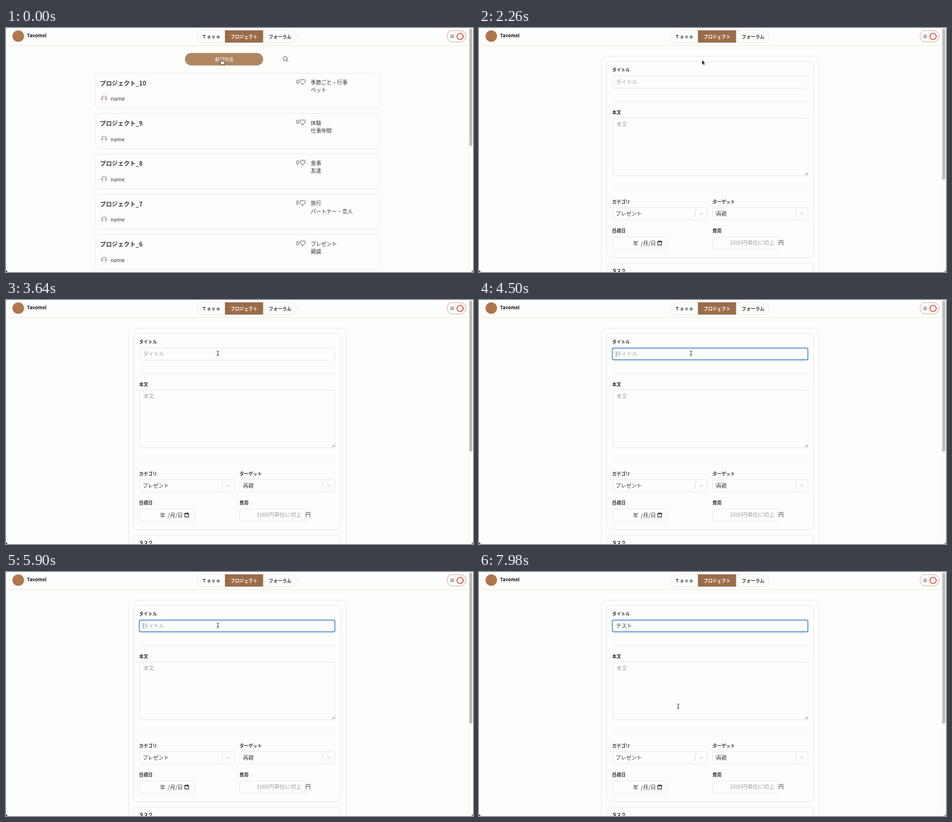
These frames come from a looping animation (800 by 420 pixels, 8 s). An HTML page:

```html
<!DOCTYPE html>
<html lang="ja">
<head>
<meta charset="utf-8">
<title>Project form</title>
<style>
  html, body { margin: 0; width: 100%; height: 100%; overflow: hidden; background: #fdfdfb; }
  svg { display: block; width: 800px; height: 420px; }
  text { font-family: "Noto Sans CJK JP", "Noto Sans CJK", "Noto Sans", sans-serif; fill: #35353a; white-space: pre; }
  .bold { font-weight: 700; }
  .hint { fill: #a0a0a4; }
  .box { fill: none; stroke: #e9e9ee; }
  .rule { stroke: #f0f0ea; }
  .icon { fill: none; stroke: #48484c; stroke-linecap: round; stroke-linejoin: round; }
</style>
</head>
<body>
<svg id="stage" viewBox="0 0 800 420" xmlns="http://www.w3.org/2000/svg"></svg>
<script>
const LOOP = 8000;
const OPEN = 2100, FOCUS = 4360, TYPED = 6460, BLUR = 7580;

// cy is the vertical middle of the glyphs
const text = (x, cy, size, str, cls = '', more = '') =>
  `<text x="${x}" y="${cy + size * 0.36}" font-size="${size}" class="${cls}" ${more}>${str}</text>`;
const box = (x1, y1, x2, y2, r, more = 'class="box"') =>
  `<rect x="${x1}" y="${y1}" width="${x2 - x1}" height="${y2 - y1}" rx="${r}" ${more}/>`;
const path = (d, more = 'class="icon"') => `<path d="${d}" ${more}/>`;
const group = (id, body) => `<g id="${id}">${body}</g>`;
const label = (x, cy, str) => text(x, cy, 7.7, str, 'bold');
const thumb = (end) => box(793.8, 1, 798.8, end, 2.5, 'fill="#bababa"');

const header = () =>
  path('M0 30.5H792', 'stroke="#eeecdc"') +
  '<circle cx="21" cy="14" r="10" fill="#b0764c"/>' +
  text(36, 13.3, 8, 'Tavomel', '', 'font-weight="900" style="fill:#111"') +
  box(327.5, 4.5, 497.5, 25.5, 10.5) +
  box(375, 4, 440.5, 25, 0, 'fill="#9a6c48"') +
  text(335.5, 14.8, 8, 'Ｔａｖｏ', 'bold') +
  text(384.7, 14.8, 7.7, 'プロジェクト', 'bold', 'style="fill:#fff"') +
  text(450, 14.8, 7.8, 'フォーラム', 'bold') +
  box(755.5, 4.5, 788, 24, 9.7, 'fill="none" stroke="#d0b09c"') +
  path('M761.5 12.2h5.6m-5.6 2.2h5.6m-5.6 2.2h5.6', 'class="icon" stroke-width=".8"') +
  '<circle cx="778" cy="14.5" r="5.3" fill="none" stroke="#d8453c" stroke-width="1.5"/>';

const card = ([topic, who], i) => `<g transform="translate(0 ${i * 69.4})">` +
  box(152.5, 77.8, 640.5, 138.3, 8) +
  text(161, 95, 10.2, 'プロジェクト_' + (10 - i), 'bold') +
  '<circle cx="168" cy="121.5" r="5.5" fill="#c6bdb8"/>' +
  '<circle cx="168" cy="120" r="2" fill="#fff"/>' +
  path('M164.3 125.2a3.8 3.2 0 0 1 7.4 0a5.5 5.5 0 0 1-7.4 0z', 'fill="#fff"') +
  text(179, 122, 9.2, 'name') +
  text(497, 93, 8.6, '0') +
  path('M508 97.2C505.4 94.9 503.4 93.3 503.4 91.2C503.4 88.4 506.6 87.7 508 90C509.4 87.7 512.6 88.4 512.6 91.2C512.6 93.3 510.6 94.9 508 97.2z') +
  text(522, 94, 9, topic) + text(522, 107.2, 9, who) + '</g>';

const list = () =>
  box(306.5, 43, 440.5, 64.5, 10.75, 'fill="#b08560"') +
  text(358, 54, 7.8, '新規作成', '', 'style="fill:#fff"') +
  '<circle cx="478.2" cy="52.8" r="3.4" class="icon"/>' + path('M480.8 55.4L483 57.6') +
  [['季節ごと・行事', 'ペット'], ['体験', '仕事仲間'], ['食事', '友達'],
   ['旅行', 'パートナー・恋人'], ['プレゼント', '親戚']].map(card).join('') +
  thumb(203);

const select = (x, value) =>
  box(x + .5, 309, x + 163.5, 330, 2.5) + text(x + 6, 319.5, 9, value) +
  path(`M${x + 142.5} 313v13`, 'stroke="#dcdcdc"') +
  path(`M${x + 149.8} 318l2.8 2.8l2.8-2.8`, 'class="icon" style="stroke:#b4b4b4"');

const form = () =>
  box(209.5, 48.5, 582.5, 440, 8) + box(218.5, 57.5, 573, 395, 7) + box(218.5, 404.5, 573, 440, 7) +
  label(228, 72.3, 'タイトル') + box(228.5, 82.5, 564, 103.5, 3) +
  path('M228 125.5H564M228 279.5H564', 'class="rule"') +
  label(228, 145.3, '本文') + box(228.5, 155.5, 564, 254.5, 3) +
  text(235.5, 165.8, 9, '本文', 'hint') +
  path('M559 253l4-4m-1.6 4l1.6-1.6', 'class="icon" stroke-width=".7"') +
  label(228, 299.2, 'カテゴリ') + select(228, 'プレゼント') +
  label(400, 299.2, 'ターゲット') + select(400, '両親') +
  label(228, 349.3, '目標日') + box(228.5, 359.5, 323, 381, 2.5) +
  text(303, 370.2, 9.3, '年\u00a0\u00a0/月/日', '', 'text-anchor="end"') +
  path('M306.6 367.2h6.2v6.4h-6.2zM306.6 368.2h6.2M308 366.2v1M311.4 366.2v1', 'class="icon" style="stroke:#111"') +
  label(400, 349.3, '費用') + box(400.5, 359.5, 513, 380.5, 2.5) +
  text(506, 370, 9.3, '1000円単位に切上', 'hint', 'text-anchor="end"') +
  text(513, 370, 9, '円') + label(228, 418.5, 'タスク') +
  group('ring', box(228.4, 82.7, 563.4, 103, 2.8, 'fill="none" stroke="#3f86d8" stroke-width="1.4"')) +
  group('hint', text(235, 92.7, 9, 'タイトル', 'hint')) +
  group('typed', text(235, 92.7, 9, 'テスト')) +
  group('caret', path('M0 88V97.5', 'stroke="#35353a" stroke-width=".7"')) +
  thumb(261);

// Each pointer is drawn around its hot spot
const pointer = () =>
  group('hand', path('M-1 .6C-1-.6 .8-.6 .9 .6V3.6L5 4.6C5.8 4.9 6 5.4 5.8 6.4L5 9.6H.2L-2.6 6C-3 5.2-2 4.6-1 5.6z',
    'fill="#fff" stroke="#111" stroke-width=".8" stroke-linejoin="round"')) +
  group('arrow', path('M0 0V8.2L1.9 6.5L3.2 9.5L4.7 8.9L3.4 6H6z', 'fill="#111" stroke="#fff" stroke-width=".6"')) +
  group('beam', path('M-1.8-4Q0-4 0-3Q0-4 1.8-4M0-3V3M-1.8 4Q0 4 0 3Q0 4 1.8 4M-.8 1.2H.8',
    'class="icon" stroke-width=".8" style="stroke:#222"'));

const corners = path('M0 420V415.5Q.4 419.6 4.5 420z', 'fill="#222"') +
  path('M800 420V415.5Q799.6 419.6 795.5 420z', 'fill="#777"');

stage.innerHTML = path('M792.5 0V420', 'stroke="#f3f3f1"') + header() +
  group('list', list()) + group('form', form()) + corners + group('pointer', pointer());

// steps: [ms, value, easing towards the next step]
function play(id, prop, steps, easing) {
  const last = steps[steps.length - 1];
  const frames = [...steps, [LOOP, last[1]]].map(([ms, value, ease]) =>
    ({ offset: ms / LOOP, [prop]: value, easing: ease || easing }));
  document.getElementById(id).animate(frames, { duration: LOOP, iterations: Infinity });
}
const show = (id, ...steps) => play(id, 'opacity', steps, 'step-end');
const move = (id, ...steps) =>
  play(id, 'transform', steps.map(([ms, x, y, ease]) => [ms, `translate(${x}px, ${y}px)`, ease]), 'step-end');

show('list', [0, 1], [OPEN, 0]);
show('form', [0, 0], [OPEN, 1]);
show('ring', [0, 0], [FOCUS, 1]);
show('hint', [0, 1], [TYPED, 0]);
show('typed', [0, 0], [TYPED, 1]);
show('caret', [0, 0], [FOCUS, 1], [BLUR, 0]);
move('caret', [0, 235, 0], [TYPED, 262.3, 0]);

show('hand', [0, 1], [OPEN, 0]);
show('arrow', [0, 0], [OPEN, 1], [3540, 0], [7660, 1], [7770, 0]);
show('beam', [0, 0], [3540, 1], [7660, 0], [7770, 1]);
move('pointer',
  [0, 369, 53.5], [10, 369, 53.5, 'ease-out'], [140, 382, 55],
  [3350, 381.6, 55, 'ease-in-out'], [3640, 363, 91.7],
  [7565, 363, 92, 'ease-in-out'], [7980, 341.3, 231.3]);
</script>
</body>
</html>
```
